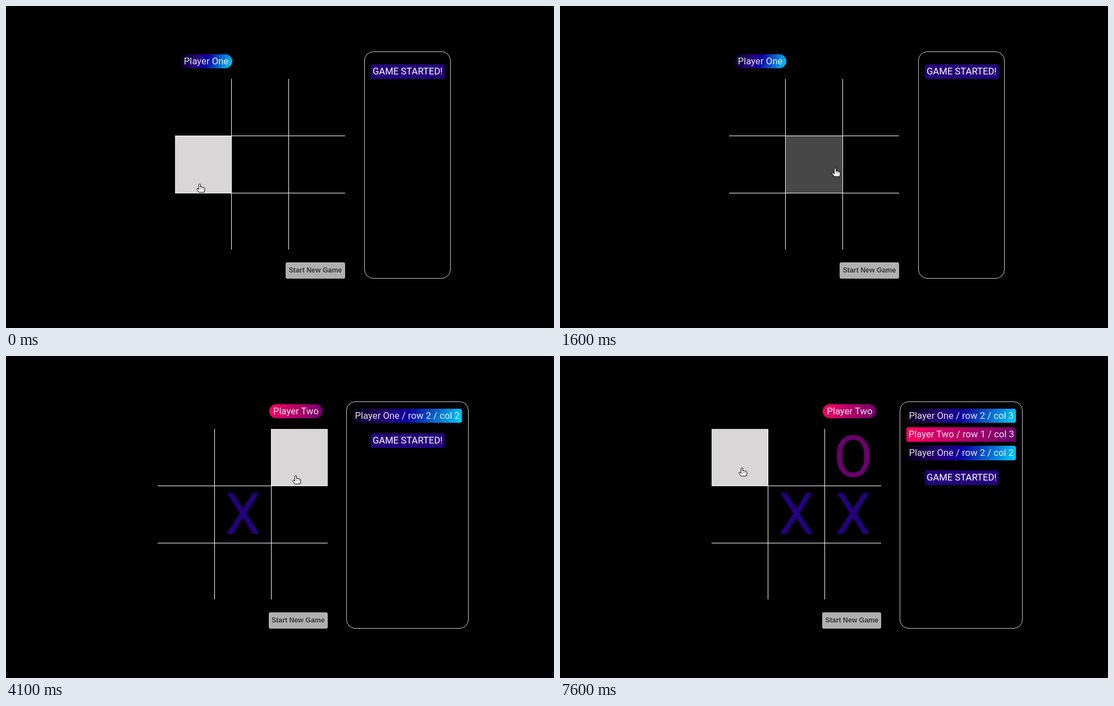
Recreate the animation shown at these times as an HTML page. Size 976 by 574 pixels, loop 8 s.

```html
<!DOCTYPE html>
<html lang="en">
<head>
<meta charset="utf-8">
<title>Tic-tac-toe</title>
<style>
html, body { margin: 0; width: 100%; height: 100%; overflow: hidden; background: #000; }
#stage { position: relative; width: 976px; height: 574px; overflow: hidden; font: 16.67px Roboto, sans-serif; }
#stage > * { position: absolute; box-sizing: border-box; text-align: center; white-space: nowrap; }
.line { background: #fff; }
.mark { font-size: 101.3px; }
.X { color: #24007c; }
.O { color: #6a006c; }
.label { color: #ffffffe0; border-radius: 4px; transform-origin: 0 0; }
.pill { border-radius: 13px; }
.One { background: linear-gradient(110deg, #04000f, #26007a 32%, #0c00a0 50%, #00d0ff); }
.Two { background: linear-gradient(110deg, #ff0062, #68006e); }
.start { background: #24007c; color: #fff; }
.panel { border: 1px solid #c8c8c8; border-radius: 16px; }
.button { background: #b0b0b0; color: #3a3a3a; border-radius: 3px; font: bold 12.35px "Liberation Sans", Arial, sans-serif; }
svg { overflow: visible; width: 1px; height: 1px; fill: #fff; stroke: #000; }
</style>
</head>
<body>
<div id="stage"></div>
<script>
const stage = document.getElementById('stage');
const LOOP = 8000, TICK = 100, FADE_IN = 300, FADE_OUT = 440, GROW = 500;
const TOP = 130, PITCH = 101.3, CENTER = 714.75;
const ENTRY_H = 25.93, ENTRY_GAP = 7.41;

// Straight pointer glides: start time, end time, x, y reached
const home = [345, 317];
const glides = [
  [300, 550, 398, 378], [550, 650, 574, 404], [1100, 1500, 514, 294], [1500, 1700, 466, 284],
  [3200, 3400, 471, 271], [3400, 3800, 516, 213], [5200, 5500, 482, 280], [5500, 5800, 501, 294],
  [6600, 7000, 480, 267], [7000, 7200, 373, 233], [7200, 7600, 324, 199]
];

const moves = [
  { at: 2250, cell: 4, mark: 'X', player: 'One' },
  { at: 4475, cell: 2, mark: 'O', player: 'Two' },
  { at: 6400, cell: 5, mark: 'X', player: 'One' }
];
const entryWidth = { One: 194.2, Two: 195.3 };

const HAND = 'M-1.5 1Q0-.8 1.5 1V6L3 5.2 5 6 7 6.4 9 7.5V11L8 15H-1.5L-5.5 9.5Q-5.5 7.5-3.5 8.5L-1.5 10ZM1.5 8v1M4 8v1M6.5 8v1';
const ARROW = 'M0 0V13L3 10.3 5 15 7.3 14 5.3 9.5H9.5Z';

const clamp = v => Math.min(1, Math.max(0, v));
const easeOut = v => 1 - (1 - clamp(v)) ** 2;
const easeInOut = v => (v = clamp(v)) < .5 ? 2 * v * v : 1 - 2 * (1 - v) ** 2;
const growth = (m, t) => easeInOut((t - m.at) / GROW);
const playedAt = t => moves.filter(m => t >= m.at);

// The panel widens with its entries and pushes the board to the left
const panelWidth = t => 23.4 + Math.max(131, ...playedAt(t).map(m => entryWidth[m.player] * growth(m, t)));
const boardLeft = t => 301.3 - (panelWidth(t) - 154.4) * .485;

function pointerAt(t) {
  let [x, y] = home;
  for (const [from, to, x1, y1] of glides) {
    const k = clamp((t - from) / (to - from));
    x += (x1 - x) * k;
    y += (y1 - y) * k;
  }
  return [x, y];
}

function cellUnder(t) {
  const [x, y] = pointerAt(t);
  return Math.floor((y - TOP) / PITCH) * 3 + Math.floor((x - boardLeft(t)) / PITCH);
}

function hoverTime(t) {
  const cell = cellUnder(t);
  let since = 0;
  while (since < FADE_IN && cellUnder(t - since - 5) === cell) since += 5;
  return since;
}

const box = (cls, x, y, w, h, text = '', style = '') =>
  `<div class="${cls}" style="left:${x}px;top:${y}px;width:${w}px;height:${h}px;line-height:${h}px;${style}">${text}</div>`;

function board(t, left, hovered) {
  const x0 = Math.floor(left), right = Math.floor(left + 302.8), bottom = 434;
  const cols = [Math.round(left + 100), Math.round(left + 201.3)], rows = [231, 333];
  const xs = [x0 - 1, ...cols, right], ys = [TOP - 1, ...rows, bottom];
  const cell = (i, cls, text, style) => {
    const c = i % 3, r = Math.floor(i / 3);
    return box(cls, xs[c] + 1, ys[r] + 1, xs[c + 1] - xs[c] - 1, ys[r + 1] - ys[r] - 1, text, style);
  };
  const shade = (i, level) => cell(i, '', '', `background:rgba(216,214,215,${level})`);

  let html = hovered < 0 ? '' : shade(hovered, easeOut(hoverTime(t) / FADE_IN));
  for (const m of playedAt(t))
    html += shade(m.cell, 1 - easeOut((t - m.at) / FADE_OUT)) + cell(m.cell, 'mark ' + m.mark, m.mark);
  for (const x of cols) html += box('line', x, TOP, 1, bottom - TOP);
  for (const y of rows) html += box('line', x0, y, right - x0, 1);
  return html;
}

function history(t) {
  const w = panelWidth(t), x = Math.round(CENTER - w / 2);
  let html = box('panel', x, 81, Math.round(CENTER + w / 2) - x, 405);
  let y = 93.5;
  for (const m of playedAt(t).reverse()) {
    const s = growth(m, t), width = entryWidth[m.player];
    const row = Math.floor(m.cell / 3) + 1, col = m.cell % 3 + 1;
    html += box('label ' + m.player, CENTER - width * s / 2, y, width, ENTRY_H,
      `Player ${m.player} / row ${row} / col ${col}`, s < 1 ? `transform:scale(${s})` : '');
    y += ENTRY_H * s + ENTRY_GAP;
  }
  return html + box('label start', CENTER - 64.9, y + 10.8, 131, 26, 'GAME STARTED!');
}

function render(t) {
  const left = boardLeft(t), played = playedAt(t), under = cellUnder(t);
  const taken = played.some(m => m.cell === under);
  const [x, y] = pointerAt(t).map(Math.round);
  stage.innerHTML = board(t, left, taken ? -1 : under)
    + (played.length % 2
      ? box('label pill Two', left + 198.3, 86, 95, 25, 'Player Two')
      : box('label pill One', left + 8.6, 86, 93.3, 25, 'Player One'))
    + box('button', left + 197.1, 457, 105.2, 29, 'Start New Game')
    + history(t)
    + `<svg style="left:${x}px;top:${y}px"><path d="${taken ? ARROW : HAND}"/></svg>`;
}

let shown = -1;
function frame() {
  const tick = Math.floor(performance.now() % LOOP / TICK);
  if (tick !== shown) render((shown = tick) * TICK);
  requestAnimationFrame(frame);
}
frame();
</script>
</body>
</html>
```
